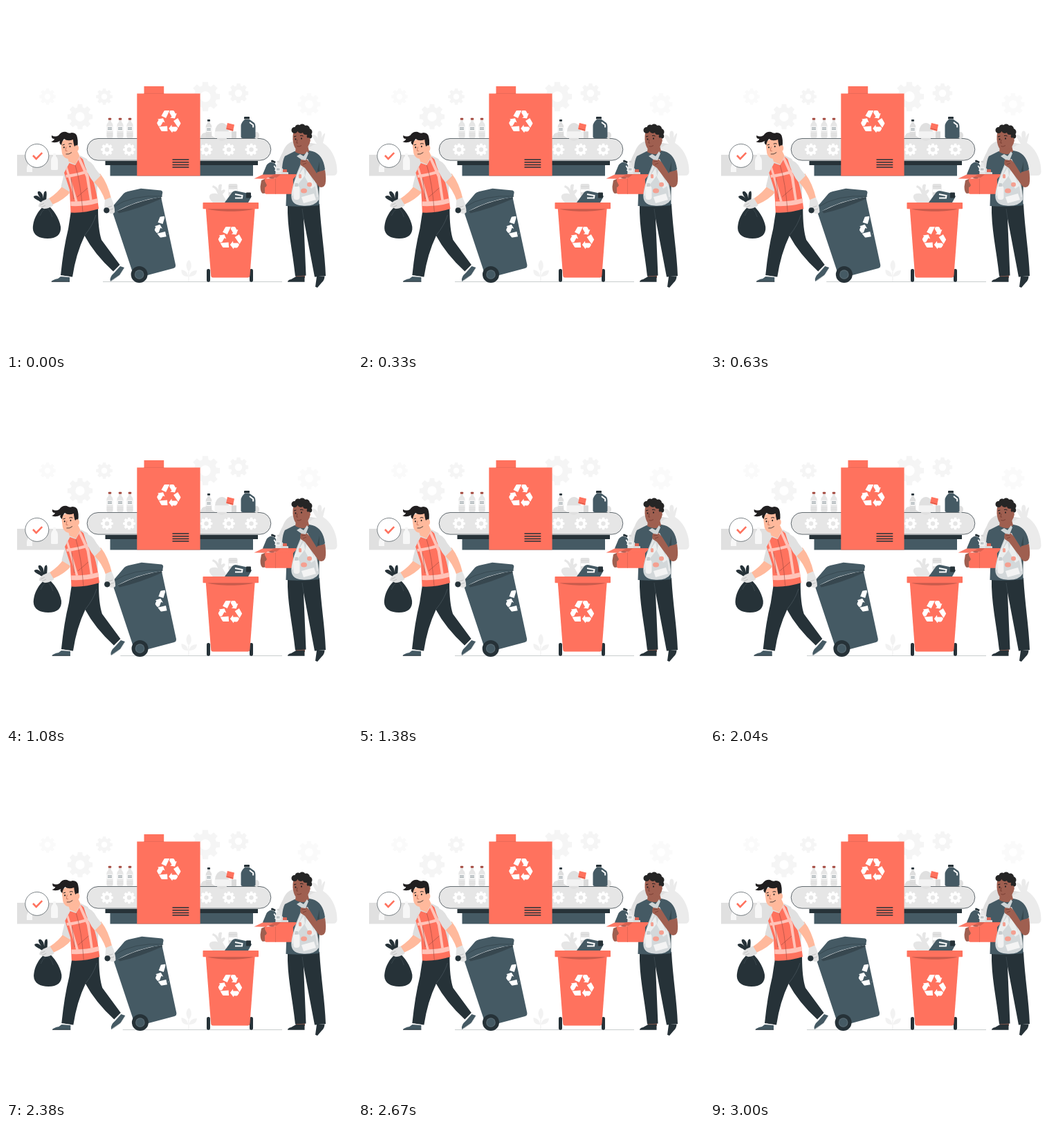
Animation of 500 by 500 pixels, one loop 3.04 s. Source, as an HTML page with a canvas:

```html
<!DOCTYPE html>
<html lang="en">
<head>
<meta charset="utf-8">
<title>Recycling</title>
<style>
html,body{margin:0;width:100%;height:100%;overflow:hidden;background:#fff}
canvas{display:block;width:100vw;height:100vh}
</style>
</head>
<body>
<canvas id="stage"></canvas>
<script>
const LOOP = 3040, RUN = 3000;
const CORAL = '#ff725e', DARK = '#263238', SLATE = '#455a64', GREY = '#e0e0e0', PALE = '#ebebeb';
const SKIN = '#ffb99c', BROWN = '#9f5f50';
const canvas = document.getElementById('stage');
const c = canvas.getContext('2d');

function fill(color, d) {
  c.fillStyle = color;
  c.fill(new Path2D(d));
}
function line(color, width, d) {
  c.strokeStyle = color;
  c.lineWidth = width;
  c.stroke(new Path2D(d));
}
function rect(color, x, y, w, h, r = 0) {
  c.fillStyle = color;
  c.beginPath();
  c.roundRect(x, y, w, h, r);
  c.fill();
}
function oval(color, x, y, rx, ry = rx) {
  c.fillStyle = color;
  c.beginPath();
  c.ellipse(x, y, rx, ry, 0, 0, 2 * Math.PI);
  c.fill();
}
function at(x, y, angle, scale, draw) {
  c.save();
  c.translate(x, y);
  c.rotate(angle);
  c.scale(scale, scale);
  draw();
  c.restore();
}

function gear(color, x, y, r) {
  c.fillStyle = color;
  c.beginPath();
  for (let i = 0; i < 8; i++) {
    const a = i * Math.PI / 4;
    [[-.28, .76], [-.18, 1], [.18, 1], [.28, .76]].forEach(([da, k]) =>
      c.lineTo(x + r * k * Math.cos(a + da), y + r * k * Math.sin(a + da)));
  }
  c.closePath();
  c.moveTo(x + r * .36, y);
  c.arc(x, y, r * .36, 0, 2 * Math.PI);
  c.fill('evenodd');
}

function recycle(x, y, angle = 0) {
  at(x, y, angle, .95, () => {
    for (let i = 0; i < 3; i++) {
      fill('#fff', 'M-11.5-9L-7.5-16Q-7-17-6-17H1L-4.5-5.5Z');
      fill('#fff', 'M2-17H6Q7.3-17 8-16L10-12.3L12-12.8L9-5L1.8-6L4.4-7.7L.7-14Z');
      c.rotate(2 * Math.PI / 3);
    }
  });
}

// Bottle standing on y = 0
function bottle(x, y, cap, body = '#e6e6e6', s = 1, angle = 0) {
  at(x, y, angle, s, () => {
    rect(cap, -2.2, -29, 4.4, 3, .8);
    fill(body, 'M-2-25.5H2V-23C5-20 4.6-18 4.6-15V-2Q4.6 0 3 0H-3Q-4.6 0-4.6-2V-15C-4.6-18-5-20-2-23Z');
    rect('#f7f7f7', -4.6, -17, 9.2, 7);
    line('#78858b', .9, 'M-3-14.8H3M-3-12.6H3');
    line('#d2d2d2', .6, 'M-4.5-6H4.5M-4.5-3.5H4.5');
  });
}

function jug(x, y, s, angle) {
  at(x, y, angle, s, () => {
    rect(DARK, -6, -31, 8, 3.5, 1);
    fill(SLATE, 'M-5-27H2L9-22Q10.5-20 10.5-17V-2Q10.5 0 8-0H-8Q-10.5 0-10.5-2V-18Q-10-23-5-27Z');
    line('#fff', 2, 'M2-23L7.2-19V-15.5');
  });
}

function backdrop() {
  gear('#fafafa', 60, 131, 12);
  gear('#f5f5f5', 142, 131, 12);
  gear('#f5f5f5', 107, 160, 18.5);
  gear('#f5f5f5', 288, 131, 21.5);
  gear('#f5f5f5', 336, 126, 14.5);
  gear('#fafafa', 438, 142, 16.5);

  rect(GREY, 16, 215, 76, 30.5);
  fill('#f7f7f7', 'M32 226H36V229Q38 231 38 234V240H30V234Q30 231 32 229Z');
  fill('#f7f7f7', 'M68 213H72V217C75 220 75 222 75 226V236Q75 237 73 237H67Q65 237 65 236V226C65 222 65 220 68 217Z');
  oval('#fff', 44.8, 216.4, 17);
  line(DARK, .6, 'M61.8 216.4A17 17 0 1 1 27.8 216.4A17 17 0 1 1 61.8 216.4Z');
  line(CORAL, 2.6, 'M39 216L43.7 220.8L52.2 212.2');

  fill(GREY, 'M388 245C390 233 396 218 400 211C405 197 415 194 424 195L452 200L455 245Z');
  fill(PALE, 'M420 245C421 224 430 205 449 199C444 192 441 186 445 186Q450 187 451 194C449 183 451 179 455 181Q457 184 456 191C459 183 463 181 460 190L458 198C470 205 479 222 478.5 240Q478 245 473 245Z');
}

function conveyor() {
  rect('#e6e6e6', 117.2, 191.5, 265.6, 31.6, 15.8);
  c.strokeStyle = DARK;
  c.lineWidth = .7;
  c.stroke();
  [146, 178, 289.5, 322, 354.5].forEach(x => gear('#fff', x, 207.5, 9));
  rect(DARK, 143.5, 224, 220.5, 6);
  rect(SLATE, 150.5, 230, 206.5, 15.4);

  [150, 165, 179].forEach(x => bottle(x, 190.8, '#a54c42'));
  oval(GREY, 312, 182, 10, 13);
  fill(GREY, 'M281 191Q282 182 290 183L303 191Z');
  oval(GREY, 362, 187, 4, 5);
  bottle(293, 191, DARK, '#dedede', .93);
  rect('#f3f3f3', 301.5, 181.3, 31, 9.5, 1);
  rect('#d9d9d9', 326, 181.3, 7, 9.5);
  fill(CORAL, 'M320 169L330 171.5L328 181L318 178Z');
  line('#d55646', 1.2, 'M319 177L328.4 179.5');
  jug(350, 191, 1, 0);

  rect(CORAL, 189.3, 126.4, 91.3, 119.2);
  rect(CORAL, 199.5, 116, 28.7, 11);
  line('#d96554', .6, 'M199.5 126.4H228.2');
  line(DARK, 1.5, 'M240.5 222H264.3M240.5 225.7H264.3M240.5 229.4H264.3M240.5 233.1H264.3');
  recycle(235.4, 167.2);
}

function coralBin() {
  fill('#f2f2f2', 'M263.3 398V384H264.7V398ZM264 384C258 376 261 369 264.5 367C268 370 270 378 264 384ZM263 391C255 391 253 386 253.5 381C259 382 263 385 263 391ZM265 391C265 385 270 382 276 382C276 387 272 391 265 391Z');
  fill('#e6e6e6', 'M299 284C292 278 292 272 299 271Q303 270 306 272Q303 263 298 262L299 259Q305 261 307 266C306 259 308 256 312 258L311 267C317 263 319 267 313 272L320 284Z');
  rect('#e2e2e2', 321.5, 257, 13, 19, 2);
  rect('#fff', 322, 265, 12, 4);
  line('#cfcfcf', .8, 'M322 261H334M322 271H334');
  fill(SLATE, 'M316 284L327 269Q329 267 332 267L346 270L352 271.5L355 275L350 284Z');
  line('#fff', 2, 'M331 272L341.5 274L341 277.5H331');
  rect(DARK, 347, 269.5, 7, 8, 1);

  rect(DARK, 290, 380, 5, 18.7, 2.2);
  rect(DARK, 352, 380, 5, 18.7, 2.2);
  fill(CORAL, 'M288.7 292H359.7L352.4 390Q352 392.6 349.5 392.6H299Q296.5 392.6 296.2 390Z');
  fill('#c85b4c', 'M291 293H358C346 298 304 298 291 293Z');
  rect(CORAL, 284.5, 284, 80.5, 9.3, .8);
  recycle(324, 335.2);
}

function carrier() {
  // legs and shoes
  fill(BROWN, 'M419 389H432V393H419Z');
  fill(DARK, 'M407 286H453C455 323 461 358 462 390L446 391.5L430 307L433.5 389.5L418 390.5C414 352 406 321 407 286Z');
  line('#465359', .6, 'M430 307L428 293');
  fill(DARK, 'M419 391L431.5 390.5V398.7H407Q407 396 412 395ZM449 391L460.5 390.5Q460 397 456 400L450 407L447 405.8Z');

  // torso and neck
  fill(SLATE, 'M417 210L403 217Q400 222 399 234L406 243L404.5 289Q430 291 452.5 288L452 245L461 236C459 221 453 213 443 210L434 208Z');
  fill('#37494f', 'M450 237L453 225L453 250L452 278L449 260Z');
  fill(BROWN, 'M419 204L435 198L438 210Q430 218 418 211Z');

  // head
  fill(BROWN, 'M415 184Q422 177 436 181L439 198Q435 209 424 209.5Q418 208 416 201Q413.5 193 415 184Z');
  c.fillStyle = '#252525';
  c.beginPath();
  [[417, 179.5, 4.5], [422, 176, 4.5], [428, 175.5, 5], [434, 177.5, 5], [437.5, 182, 5], [438.5, 188, 3.8], [426, 179, 5], [433, 182, 4]]
    .forEach(([x, y, r]) => { c.moveTo(x + r, y); c.arc(x, y, r, 0, 7); });
  c.fill();
  oval(BROWN, 437, 194, 2.8, 3.8);
  oval('#231f20', 418.5, 192.5, .9, 1.2);
  oval('#231f20', 427, 191.5, .9, 1.2);
  line('#231f20', 1, 'M416 189L419.3 188M425 187.5Q427 186.5 429.5 188');
  line('#70382e', .8, 'M421 193L419.8 198H422M420.5 202.6Q423.5 204 427 201.6');

  // box
  fill(BROWN, 'M376 249L369 252L367.5 261Q367.5 269 371 271L379 270Z');
  jug(378.5, 247.5, .82, .4);
  bottle(393, 247, '#d5d5d5', '#e7e7e7', .8, .02);
  rect('#d76556', 400, 236, 6, 5, 1);
  rect('#d8d8d8', 398, 240, 10, 5, 1);
  fill('#d96251', 'M375 248L388 243H420L413 250Z');
  fill(CORAL, 'M374 249.5L415 248V269Q415 271.8 413 271.8H376Q374 271.8 374 270Z');
  line('#d96251', .7, 'M389.5 249V271.8');
  fill('#fb7966', 'M358.5 249.5L371 243.5H388L375 249.8Z');
  fill(CORAL, 'M389 249.5L397 243.5H421L415 250Z');
  fill(BROWN, 'M373 251L369 256L370 260L375 262L377 259Z');

  // translucent bag
  fill('#d3d8da', 'M429 221C422 237 415 254 412.5 270C411 282 416 288 428 288.5Q446 290 452 280C453 265 446 241 436 221Z');
  fill('#ebeeee', 'M430 234L417 254L421 259L432 245ZM435 235L447 260L441 264L432 247Z');
  rect('#f2f2f2', 415.5, 260, 9, 20, 4);
  rect('#c7cdcf', 417, 256, 5, 5, 1);
  oval('#f4a091', 430.5, 267, 4.5, 3.6);
  oval('#f4a091', 438.5, 258, 3.5, 3.2);
  rect('#f4a091', 423, 243, 4, 6, 1.5);
  fill('#f4f4f4', 'M427 276L445 271L448 280L430 285Z');
  line('#fafafa', .9, 'M429 228C422 243 415 258 414 274M436 229C443 244 449 260 450 276');

  // raised arm
  fill(BROWN, 'M450 240L461 237Q463 250 461.5 257Q459 264 452 261L432 234L426 230Q424 225 427 221L433 220L439 226L449 242Z');
  fill('#cfd5d7', 'M427 222L420 217L425 214L430 217L435 210L437 213L433 223Z');
  line('#71382f', .7, 'M427 225L433 224M429 229L434 227');
}

function rollingBin() {
  fill(SLATE, 'M154 298L224 276L245 374Q245.5 378 242 379L197 391L183 385Z');
  fill('#37474f', 'M161 297Q184 283 224 276L224.5 278.5Q192 293 163 299.5Z');
  fill(SLATE, 'M153 291L170 271Q172 269 176 268L195 263.8L224 266.5Q227 267.5 226 271L225 276Q190 280 157 298Z');
  line('#35464d', .8, 'M154 291Q183 272 226 275');
  c.save();
  c.clip(new Path2D('M205 282L224 278L232 321L237 355L208 350Z'));
  recycle(231.5, 319.5, -.15);
  c.restore();
  oval(DARK, 192.6, 388, 12);
  oval('#586a73', 192.6, 388, 6.8);
  oval(SLATE, 192.6, 388, 5.6);
}

function worker() {
  // sack
  fill(DARK, 'M57 288C49 292 39 306 38.8 321C39 331 48 336 60 336C73 336 80 330 79 319C77 306 67 293 61 288Z');
  fill(DARK, 'M55 288C50 281 39 279 40 275Q45 272 50 278C44 270 45 267 49 268Q53 270 54 278C54 271 55 267 58 267.5C60 272 57 281 59 287Z');
  line('#45535a', .6, 'M57 292Q51 297 49 303M60 292Q66 299 67 305');

  // far arm
  fill(SKIN, 'M82 259Q76 269 61 279L67 287Q84 280 94 268Z');
  fill('#dedede', 'M87 230L79.5 261L91 268L97 240Z');
  fill(GREY, 'M62 277.5L68.5 288Q62 293 55 293L47 290Q46 286 53 281.5Z');
  line('#aaa', .6, 'M49 288L55 285M51 291L57 288');

  // legs and shoes
  fill(DARK, 'M109 296L133 293Q133 323 138 338L164.5 374L155 383.5Q128 359 113 331Z');
  fill(DARK, 'M94 296L133 293Q128 314 114 331Q101 358 96 391.5L79 389Q83 350 90 322Z');
  line('#4a575d', .7, 'M130 302Q126 316 114 331');
  fill('#f2f2f2', 'M81 389.5L92 391V394H80ZM156 383L164 375L166 378L158 386Z');
  fill(SLATE, 'M79 391L92 392V398.5H65.5Q67 395.5 75 394Z');
  line(DARK, .9, 'M65.8 398.2H92');
  fill(SLATE, 'M157 385L165 376L171 378L164 389Q155 396 151 398Q149.5 394 153 389Z');
  line('#ddd', .7, 'M171 379L165 388.5L151.5 397.5');

  // neck, shirt and vest
  fill(SKIN, 'M88 215L102 207L108 220L101 230L91 226Z');
  fill('#dedede', 'M91 225L100 229L107 216L117 221L132 260L131 288L94 290L88 240Z');
  fill(CORAL, 'M91.5 227L84 241L92 266L93.5 298.5Q114 299.5 134 293C131 265 124 240 113 223L107 218L100 230Z');
  fill('#ffc3b8', 'M93.3 282.5Q114 283 132.4 278L133.2 284.5Q115 290 93.5 289Z');
  fill('#ffc3b8', 'M88.5 232L86.5 236L100 283L103.5 282.5Z');
  fill('#ffc3b8', 'M104 221L107 218.8L119.5 245L124.5 280L121 281L115.5 247Z');
  line('#ffc3b8', 4, 'M86.5 246Q104 244 118 239');
  line('#9b493f', .6, 'M100 230Q108 255 111 298M103 276L118 263M94 249L98 279');

  // head
  fill(SKIN, 'M79 197Q88 189 101 194L104 207Q100 218 91 221Q83 220 81 213Z');
  fill('#211f20', 'M80 201Q76 198 78 195Q71 199 65 196Q69 195 70 192Q65 192 66 187Q71 190 76 187Q80 181 87 182Q91 185 95 183Q102 183 103 190Q105 199 102 206L98.5 202Q97 196 97 193Q89 196 84 192Q81 195 80 201Z');
  oval(SKIN, 102, 205.5, 3, 4.2);
  oval('#222', 83.8, 204.3, .9, 1.2);
  oval('#222', 92.5, 203, .9, 1.2);
  line('#222', 1, 'M81.5 201L84.8 200M90.5 199.3Q93 198 95.3 199.2');
  line('#c06c55', .8, 'M87 203.5L86 209.3L88.7 209.5');
  line('#222', .8, 'M86.5 214Q91 215 95 211.5');

  // near arm
  line(DARK, 5, 'M146 295L156 291.5');
  fill(SKIN, 'M136 242Q147 256 152 278L143.5 282Q138 265 126 253Z');
  fill('#e1e1e1', 'M111 221Q124 223 130 236L137 245L127 255Q117 244 111 221Z');
  fill('#e4e4e4', 'M143 280L151.5 276.5Q157 287 157.2 298Q154 302 149 299L142 292Z');
  line('#aaa', .6, 'M147 291L153 289M149 295L155 293');
  oval(DARK, 145.3, 295.3, 4.1);
}

const KEYS = [0, -1, 2, -4, 4, -4, 4, -4, 2, -1, 0];

// cubic-bezier(.42, 0, .58, 1)
function ease(x) {
  let lo = 0, hi = 1, s = .5;
  for (let i = 0; i < 20; i++) {
    s = (lo + hi) / 2;
    const bx = 1.26 * s * (1 - s) ** 2 + 1.74 * s * s * (1 - s) + s ** 3;
    if (bx < x) lo = s; else hi = s;
  }
  return s * s * (3 - 2 * s);
}

function shake(t) {
  const p = Math.min(t / RUN, 1) * 10;
  const i = Math.min(Math.floor(p), 9);
  return (KEYS[i] + (KEYS[i + 1] - KEYS[i]) * ease(p - i)) * 2 / 3;
}

function draw(t) {
  const dpr = window.devicePixelRatio || 1;
  const w = Math.round(innerWidth * dpr), h = Math.round(innerHeight * dpr);
  if (canvas.width !== w || canvas.height !== h) {
    canvas.width = w;
    canvas.height = h;
  }
  c.setTransform(w / 500, 0, 0, h / 500, 0, 0);
  c.fillStyle = '#fff';
  c.fillRect(0, 0, 500, 500);
  const dx = shake(t);
  backdrop();
  conveyor();
  line('#a5abae', .6, `M${dx < .6 ? 140 : 157 + 9 * dx} 398.5H399`);
  coralBin();
  carrier();
  at(dx, 0, 0, 1, () => {
    rollingBin();
    worker();
  });
}

const start = performance.now();
function frame() {
  draw((performance.now() - start) % LOOP);
  requestAnimationFrame(frame);
}
frame();
</script>
</body>
</html>
```
